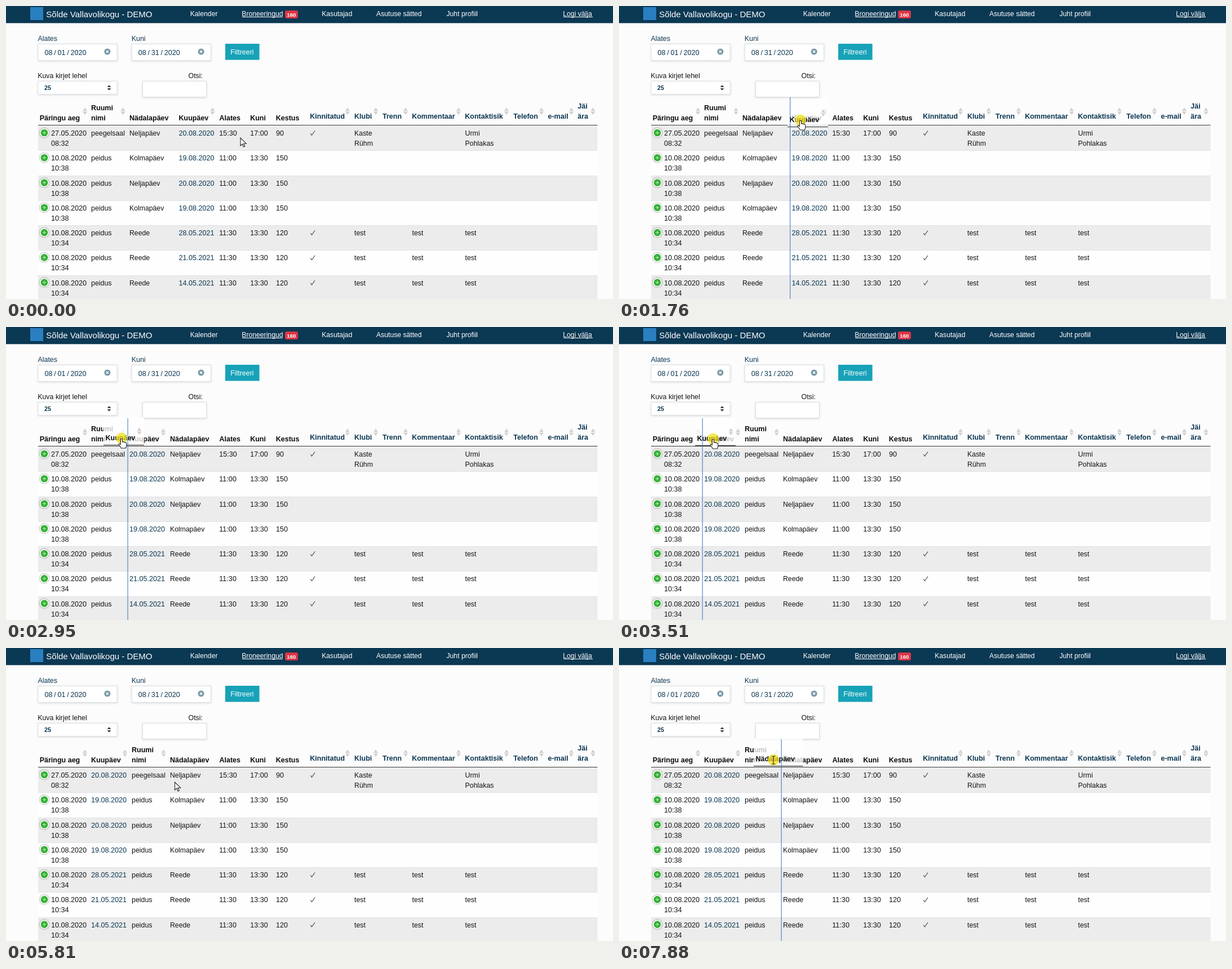
An HTML page with a canvas that plays this animation: 1077x520 px, repeating every 7990 ms.

```html
<!DOCTYPE html>
<html lang="et">
<head>
<meta charset="utf-8">
<title>Broneeringud</title>
<style>
html, body { margin: 0; width: 100%; height: 100%; overflow: hidden; background: #fcfcfc; }
canvas { display: block; }
</style>
</head>
<body>
<canvas id="stage" width="1077" height="520"></canvas>
<script>
const ctx = document.getElementById('stage').getContext('2d');
const LOOP = 7990;
const NAVY = '#0b3651', INK = '#111417', FONT = '"Liberation Sans", Arial, sans-serif';
const ROW_TOP = 212, ROW_H = 44.27, LEFT = 57, RIGHT = 1049.5, PAD = 3.5;

// Bursts of movement: first step, last step, number of steps
const BURSTS = [
  [220, 980, 8], [1100, 1100, 1], [1420, 2190, 8], [2300, 2510, 3],
  [2730, 3510, 8], [3610, 3740, 2], [4160, 4160, 1], [5040, 5580, 6],
  [5810, 6560, 8], [6680, 6680, 1], [6900, 6900, 1], [7110, 7880, 8]
];

// Time, x, y
const POINTER = [
  [0, 416, 234], [110, 416, 234], [980, 335.5, 201], [1100, 335, 200], [1420, 335, 200],
  [1640, 331, 203], [1750, 322, 203], [2190, 297, 201], [2510, 261, 198],
  [2950, 205, 198], [3170, 181, 198], [3510, 167, 199], [3740, 161, 200],
  [4930, 161, 200], [5580, 328, 261], [5810, 299.5, 238], [6030, 277, 217],
  [6560, 321, 202], [6680, 322, 202], [7000, 322, 202], [7220, 311, 201], [7880, 274, 199]
];
const DATE_DRAG = [
  [1750, 299, 3], [2190, 265, 1], [2510, 229, -2], [2950, 173, -2],
  [3170, 149, -2], [3510, 135, -1], [3740, 129, 0]
];
const DAY_DRAG = [[7220, 276, 0], [7880, 239, -2]];

const MOVABLE = {
  room: { width: 68, title: ['Ruumi', 'nimi'], arrow: 60 },
  day: { width: 87.5, title: ['Nädalapäev'] },
  date: { width: 72, title: ['Kuupäev'], arrow: 63.5 }
};
const FIXED_LEFT = [['Päringu aeg', 59.7], ['Alates', 378.5], ['Kuni', 433.2], ['Kestus', 478.7]];
const FIXED_RIGHT = [
  ['Kinnitatud', 539.3, 606], ['Klubi', 618, 656], ['Trenn', 668, 709],
  ['Kommentaar', 720.2, 803], ['Kontaktisik', 814.3, 888],
  ['Telefon', 900.3, 950], ['e-mail', 961.5, 1003]
];

const early = (day, date) => ({
  asked: ['10.08.2020', '10:38'], room: 'peidus', day, date, from: '11:00', to: '13:30', length: '150'
});
const friday = date => ({
  asked: ['10.08.2020', '10:34'], room: 'peidus', day: 'Reede', date, from: '11:30', to: '13:30',
  length: '120', ok: true, club: ['test'], note: 'test', contact: ['test']
});
const ROWS = [
  { asked: ['27.05.2020', '08:32'], room: 'peegelsaal', day: 'Neljapäev', date: '20.08.2020',
    from: '15:30', to: '17:00', length: '90', ok: true, club: ['Kaste', 'Rühm'], contact: ['Urmi', 'Pohlakas'] },
  early('Kolmapäev', '19.08.2020'), early('Neljapäev', '20.08.2020'), early('Kolmapäev', '19.08.2020'),
  friday('28.05.2021'), friday('21.05.2021'), friday('14.05.2021')
];

const HAND = new Path2D('M-1.7 1.2Q0-.6 1.5 1.2V6Q3.4 5 4.4 6.5Q6 5.8 6.8 7.2Q8.6 6.8 8.8 8.6V12Q8.6 14 7.4 17H-.6Q-1.4 14.5-5 10.8Q-5.2 8.8-3.2 9.2L-1.7 10.6Z');
const ARROW = new Path2D('M0 0V14L3.3 10.9L5.6 16L7.8 15L5.5 10.2H10.2Z');
const BEAM = new Path2D('M-3.5-7H-1Q0-7 0-6V6Q0 7-1 7H-3.5M3.5-7H1Q0-7 0-6M0 6Q0 7 1 7H3.5');

function text(str, x, y, color = INK, size = 12.4, weight = 400) {
  ctx.font = `${weight} ${size}px ${FONT}`;
  ctx.fillStyle = color;
  ctx.fillText(str, x, y);
}
const bold = (str, x, y, color = '#0c0c0c') => text(str, x, y, color, 12.5, 700);
const digits = (str, x, y, color = INK) => text(str, x, y, color, 12.6);

function rect(x, y, w, h, color) {
  ctx.fillStyle = color;
  ctx.fillRect(x, y, w, h);
}

function disc(x, y, r, color) {
  ctx.fillStyle = color;
  ctx.beginPath();
  ctx.arc(x, y, r, 0, 7);
  ctx.fill();
}

function poly(points, color) {
  ctx.fillStyle = color;
  ctx.beginPath();
  points.forEach(([x, y]) => ctx.lineTo(x, y));
  ctx.fill();
}

function lines(segments, color, width) {
  ctx.strokeStyle = color;
  ctx.lineWidth = width;
  ctx.beginPath();
  for (const [x1, y1, x2, y2] of segments) {
    ctx.moveTo(x1, y1);
    ctx.lineTo(x2, y2);
  }
  ctx.stroke();
}

function field(x, y, w, h) {
  ctx.save();
  ctx.shadowColor = 'rgba(0,0,0,.14)';
  ctx.shadowBlur = 4;
  ctx.shadowOffsetY = 1;
  rect(x, y, w, h, '#fff');
  ctx.restore();
  ctx.strokeStyle = '#dcdfe1';
  ctx.lineWidth = 1;
  ctx.strokeRect(x + 0.5, y + 0.5, w - 1, h - 1);
}

function arrows(x, y, color, half, height, gap) {
  poly([[x - half, y - gap], [x, y - gap - height], [x + half, y - gap]], color);
  poly([[x - half, y + gap], [x, y + gap + height], [x + half, y + gap]], color);
}
const sortMark = (x, dy = 0) => arrows(x, 186.8 + dy, '#d0d0d0', 4, 5.7, 0.6);

function track(keys, t) {
  let i = 0;
  while (i < keys.length - 2 && t > keys[i + 1][0]) i++;
  const [a, b] = [keys[i], keys[i + 1]];
  const f = Math.min(1, Math.max(0, (t - a[0]) / (b[0] - a[0])));
  return [a[1] + (b[1] - a[1]) * f, a[2] + (b[2] - a[2]) * f];
}

// Holds the picture between steps
function stepTime(t) {
  let held = 0;
  for (const [from, to, count] of BURSTS) {
    if (t < from) break;
    const gap = (to - from) / Math.max(1, count - 1);
    for (let i = 0; i < count; i++) {
      const at = Math.floor((from + i * gap + 0.01) / 10) * 10;
      if (at <= t) held = at;
    }
  }
  return held;
}

function drawNav() {
  rect(0, 0, 1077, 30.4, '#0b3853');
  rect(43, 2, 23, 23, '#2a7fc0');
  text('Sõlde Vallavolikogu - DEMO', 71.3, 19.5, '#fff', 15);
  [['Kalender', 326.7], ['Broneeringud', 418.3], ['Kasutajad', 560.2], ['Asutuse sätted', 657],
    ['Juht profiil', 781.5], ['Logi välja', 988.3]].forEach(([s, x]) => text(s, x, 18, '#fff', 12.2));
  rect(419, 19, 72, 1, '#fff');
  rect(989, 19, 52, 1, '#fff');
  ctx.fillStyle = '#dc3545';
  ctx.beginPath();
  ctx.roundRect(495, 8, 23, 14, 3);
  ctx.fill();
  text('160', 498.2, 18.5, '#fff', 9.8, 700);
}

function dateField(x, label, day) {
  text(label, x, 62, NAVY);
  field(x, 67, 141, 30);
  [['08', 12], ['/', 28.7], [day, 35], ['/', 51.7], ['2020', 58]]
    .forEach(([s, dx]) => digits(s, x + dx, 86.5, NAVY));
  const cx = x + 123.3, cy = 81, d = 2;
  disc(cx, cy, 5.5, '#7898a6');
  lines([[cx - d, cy - d, cx + d, cy + d], [cx - d, cy + d, cx + d, cy - d]], '#fff', 1.4);
}

function drawFilters() {
  dateField(56.5, 'Alates', '01');
  dateField(222.8, 'Kuni', '31');
  rect(389, 67, 60.6, 28.6, '#17a2b8');
  text('Filtreeri', 398.2, 86, '#fff');
  text('Kuva kirjet lehel', 56.2, 128.2);
  text('Otsi:', 323.5, 128.2);
  field(56.5, 133, 141, 24);
  text('25', 68, 149, NAVY, 10.8, 700);
  arrows(183, 145, '#343a40', 3.4, 3.8, 1);
  field(242, 133, 114, 29);
}

function columnTitle(key, x, dy = 0) {
  const { title, arrow } = MOVABLE[key];
  title.forEach((s, i) => bold(s, x + PAD, 203 + dy - 18 * (title.length - 1 - i)));
  if (arrow) sortMark(x + arrow, dy);
}

function drawHeader(cols) {
  FIXED_LEFT.forEach(([s, x]) => bold(s, x, 203));
  sortMark(140);
  FIXED_RIGHT.forEach(([s, x, mark]) => {
    bold(s, x, 200.3, NAVY);
    sortMark(mark);
  });
  bold('Jäi', 1014.3, 182, NAVY);
  bold('ära', 1014.3, 200.3, NAVY);
  sortMark(1041.5);
  for (const key in cols) columnTitle(key, cols[key]);
}

function plusButton(x, y) {
  ctx.save();
  ctx.shadowColor = 'rgba(0,0,0,.55)';
  ctx.shadowBlur = 3;
  disc(x, y, 8, '#fff');
  ctx.restore();
  disc(x, y, 6.3, '#31b131');
  lines([[x - 3, y, x + 3, y], [x, y - 3, x, y + 3]], '#cdeecd', 1);
}

function drawRow(row, i, cols) {
  const top = ROW_TOP + i * ROW_H, y = top + 18, edge = Math.round(top);
  const stack = (list, x, draw) => list.forEach((s, n) => draw(s, x, y + 18 * n));
  rect(LEFT, edge, RIGHT - LEFT, 45, i % 2 ? '#fefefe' : '#ececec');
  if (i) rect(LEFT, edge, RIGHT - LEFT, 1, '#e1e3e5');
  plusButton(68, top + 13);
  stack(row.asked, 80, digits);
  text(row.room, cols.room + PAD, y);
  text(row.day, cols.day + PAD, y, INK, 12.25);
  digits(row.date, cols.date + PAD, y, NAVY);
  digits(row.from, 378.3, y);
  digits(row.to, 433.2, y);
  digits(row.length, 479, y);
  if (row.ok) lines([[540.5, y - 4, 542.6, y - 0.4], [542.4, y - 0.4, 548, y - 8.6]], INK, 1);
  if (row.club) stack(row.club, 618, text);
  if (row.note) text(row.note, 720.5, y);
  if (row.contact) stack(row.contact, 814.5, text);
}

function layout(t) {
  const order = t < 2730 ? ['room', 'day', 'date'] : t < 3170 ? ['room', 'date', 'day'] : ['date', 'room', 'day'];
  const cols = {};
  let x = 147.5;
  for (const key of order) {
    cols[key] = x;
    x += MOVABLE[key].width;
  }
  return cols;
}

function drawDrag(key, keys, t, cols) {
  const [x, dy] = track(keys, t), w = MOVABLE[key].width;
  rect(x, 162 + dy, w, 49, 'rgba(255,255,255,.75)');
  rect(x, Math.round(211 + dy), w, 1, '#222');
  columnTitle(key, x, dy);
  rect(cols[key], 162, 1.2, 358, 'rgba(40,110,185,.8)');
}

function drawPointer(t) {
  const [x, y] = track(POINTER, t);
  if ((t >= 1420 && t < 4160) || t >= 6900) disc(x, y - 0.5, 10, 'rgba(244,224,16,.72)');
  ctx.save();
  ctx.translate(x, y);
  ctx.lineWidth = 1.1;
  ctx.strokeStyle = '#222';
  ctx.fillStyle = '#fff';
  if (y < 211 && t > 6000) {
    ctx.stroke(BEAM);
  } else {
    const shape = y < 211 ? HAND : ARROW;
    ctx.fill(shape);
    ctx.stroke(shape);
  }
  ctx.restore();
}

function frame(now) {
  const t = stepTime(now % LOOP), cols = layout(t);
  rect(0, 0, 1077, 520, '#fcfcfc');
  drawNav();
  drawFilters();
  ROWS.forEach((row, i) => drawRow(row, i, cols));
  drawHeader(cols);
  rect(LEFT, 211, RIGHT - LEFT, 1, '#3a3a3a');
  if (t >= 1750 && t < 4160) drawDrag('date', DATE_DRAG, t, cols);
  if (t >= 7220) drawDrag('day', DAY_DRAG, t, cols);
  drawPointer(t);
}

let start;
function tick(now) {
  start ??= now;
  frame(Math.max(0, now - start));
  requestAnimationFrame(tick);
}
requestAnimationFrame(tick);
</script>
</body>
</html>
```
